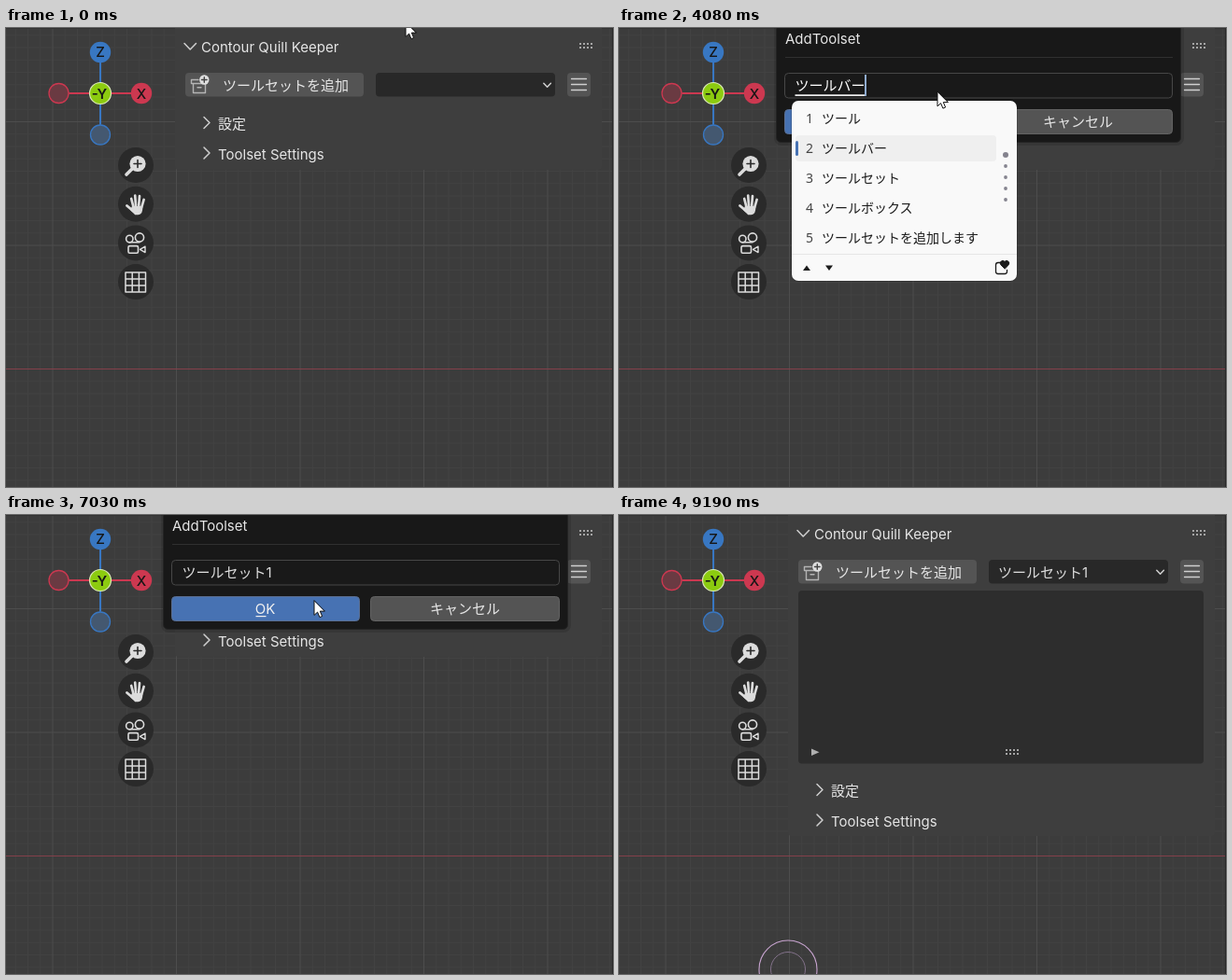
An HTML page that plays this animation: 650 px wide and 492 px high, repeating every 9320 ms.

```html
<!DOCTYPE html>
<html lang="ja">
<head>
<meta charset="utf-8">
<title>Toolset panel</title>
<style>
  html, body { margin: 0; width: 100%; height: 100%; overflow: hidden; background: #3c3c3c; }
  svg { display: block; width: 650px; height: 492px; }
  text { font-family: Inter, "Noto Sans CJK JP", sans-serif; font-size: 15px; white-space: pre; }
  .ime text { font-family: "Noto Sans", "Noto Sans CJK JP", sans-serif; font-size: 14px; }
</style>
</head>
<body>
<svg id="stage" viewBox="0 0 650 492" xmlns="http://www.w3.org/2000/svg"></svg>
<script>
const LOOP = 9320;
const stage = document.getElementById('stage');

// ---- markup helpers ----
const rect = (x, y, w, h, fill, r = 0, extra = '') =>
  `<rect x="${x}" y="${y}" width="${w}" height="${h}" rx="${r}" fill="${fill}" ${extra}/>`;
const circle = (x, y, r, fill, extra = '') =>
  `<circle cx="${x}" cy="${y}" r="${r}" fill="${fill}" ${extra}/>`;
const path = (d, stroke, w = 1.5, fill = 'none') =>
  `<path d="${d}" stroke="${stroke}" stroke-width="${w}" fill="${fill}" stroke-linecap="round" stroke-linejoin="round"/>`;
const text = (x, y, s, fill = '#e6e6e6', extra = '') =>
  `<text x="${x}" y="${y}" fill="${fill}" ${extra}>${s}</text>`;
const group = (id, body, extra = '') => `<g id="${id}" ${extra}>${body}</g>`;

function grip(x, y) {
  let s = '';
  for (let i = 0; i < 8; i++) s += rect(x + (i % 4) * 4, y + (i >> 2) * 4, 2, 2, '#a6a6a6');
  return s;
}

function viewport() {
  const step = 13.25;
  let minor = '', major = '';
  for (let i = -3; i < 46; i++) {
    const x = 50 + i * step, y = 100.5 + (i - 4) * step;
    const v = `M${x} 0V492`, h = `M0 ${y}H650`;
    if (i % 10 === 0) major += v; else minor += v;
    if ((i - 4) % 10 === 0) major += h; else minor += h;
  }
  return rect(0, 0, 650, 492, '#3c3c3c') + path(minor, '#424242', 1) + path(major, '#4d4d4d', 1) +
    path('M0 365.5H650', '#84404a', 1.2) +
    rect(0, 0, 650, 1, '#323232') + rect(649, 0, 1, 492, '#282828');
}

function gizmo() {
  const red = '#cc3850', blue = '#3877c2', ink = '#161616';
  const label = (x, y, s, w) => text(x, y, s, ink, `text-anchor="middle" font-weight="${w}"`);
  return path('M101 36V59', blue, 2) + path('M68 70H134', red, 2) + path('M101 82V103', blue, 2) +
    circle(56.5, 70, 10.5, '#6a3a42', `stroke="${red}" stroke-width="1.3"`) +
    circle(101, 114.5, 10.5, '#445870', `stroke="${blue}" stroke-width="1.3"`) +
    circle(101, 26, 11.2, blue) + circle(145, 70, 11.2, red) +
    circle(101, 70, 11.5, '#8ccb10', 'stroke="#dbe9b9" stroke-width="1.2"') +
    label(101, 31, 'Z', 500) + label(145, 75.5, 'X', 500) + label(100, 75.5, '-Y', 600);
}

function navButtons() {
  const c = '#dcdcdc';
  let s = '';
  for (let i = 0; i < 4; i++) s += circle(139, 147 + i * 41.7, 19, '#2a2a2a');
  // zoom
  s += path('M135 151L129 157', c, 3.6) + circle(141, 145.5, 8.6, c) + path('M141 141.5V149.5M137 145.5H145', '#2a2a2a', 1.6);
  // pan
  s += path('M134.2 183L136.5 192M138.2 179.5L139 190M143 180.2L142.2 190M147.6 184L145 193', c, 2.7) +
    path('M129.5 190.5L136 196', c, 2.9) +
    path('M135.5 191.5H145.5Q146 199 141.5 199.5H138.5L134 195Z', c, 1.5, c);
  // camera
  s += circle(132.3, 226, 3.7, 'none', `stroke="${c}" stroke-width="1.6"`) +
    circle(143, 224.5, 4.6, 'none', `stroke="${c}" stroke-width="1.6"`) +
    path('M132 229.8H143', c, 1.6) +
    rect(131, 233.6, 10.5, 7.6, 'none', 1.5, `stroke="${c}" stroke-width="1.6"`) +
    path('M143.5 237.4L149 234.2V240.6Z', c, 1.4);
  // grid
  s += path('M128 262H149.5V283H128ZM135.2 262V283M142.4 262V283M128 269H149.5M128 276H149.5', c, 1.5);
  return s;
}

function panel() {
  const c = '#cfcfcf';
  const sub = y => path(`M212 ${y - 6}L218 ${y}L212 ${y + 6}`, c, 1.5);
  return path('M181 0H638V148Q638 152 634 152H185Q181 152 181 148Z', 'none', 0, '#3e3e3e')
      .replace('<path', '<path id="panelBg"') +
    path('M191 16.5L197.2 23L203.5 16.5', c) +
    text(209, 25.5, 'Contour Quill Keeper') + grip(614, 16) +
    rect(192, 48, 191, 25.5, '#545454', 4, 'id="addBtn"') +
    path('M206 55.5H198.5V59.5H214.5M200.5 59.5V69.5H213.5V60M205 63.8H209', '#b4b4b4', 1.4) +
    circle(212.3, 55.5, 5.2, '#dedede') + path('M212.3 52.7V58.3M209.5 55.5H215.1', '#444', 1.4) +
    text(232, 66.5, 'ツールセットを追加') +
    rect(396, 48, 192, 25.5, '#282828', 4, 'id="drop"') +
    text(406, 66.5, '', '#dcdcdc', 'id="dropText"') +
    path('M575.8 59.3L579.6 63.3L583.4 59.3', c) +
    rect(601, 48, 25, 25.5, '#545454', 4) + path('M605.5 54.5H621.5M605.5 60.5H621.5M605.5 66.5H621.5', c, 1.3) +
    group('list', rect(192, 81, 434, 185.5, '#2d2d2d', 4) +
      path('M206 250.5L214.5 254.3L206 258Z', 'none', 0, '#b0b0b0') + grip(414, 251)) +
    group('subs', sub(101.5) + text(227, 108, '設定') + sub(134) + text(227, 140.5, 'Toolset Settings'));
}

function dialog() {
  return rect(166, -8, 439, 134, '#000', 8, 'opacity=".13"') +
    rect(168.5, -10, 433, 132.5, '#181818', 5, 'stroke="#242424"') +
    text(178, 17, 'AddToolset') + rect(178, 31, 415, 1, '#303030') +
    rect(177.5, 48.5, 415, 26.5, '#191919', 4, 'stroke="#474747"') +
    rect(177.5, 87.5, 201, 26, '#4772b3', 4, 'id="ok" stroke="#5b6f92"') +
    text(277.5, 106, 'OK', '#f0f0f0', 'text-anchor="middle"') + rect(267.5, 108, 11, 1.2, '#f0f0f0') +
    rect(390.5, 87.5, 202, 26, '#545454', 4, 'stroke="#636363"') +
    text(491.5, 106, 'キャンセル', '#e6e6e6', 'text-anchor="middle"') +
    text(188.5, 67, '', '#fff', 'id="entry"') +
    rect(0, 71.3, 0, 1.6, '#fff', 0, 'id="under"') +
    rect(0, 50, 2, 23, '#8fabcf', 0, 'id="caret"');
}

// Candidate window between x and right edge; pick is the selected row or -1.
function candidates({ x, right, rows, pick = -1 }) {
  const ink = '#1c1c1c', w = right - x;
  let s = rect(x - 1, 78, w + 2, 194, '#000', 8, 'opacity=".15"') + rect(x, 78, w, 193, '#f9f9f9', 7);
  rows.forEach((row, i) => {
    const y = 102 + i * 32;
    if (i === pick) s += rect(x + 4, y - 19, w - 26, 28, '#efefef', 4) + rect(x + 4, y - 13, 3, 16, '#4772b3', 1.5);
    s += text(x + 15, y, i + 1, pick < 0 ? '#9b9b9b' : '#444') + text(x + 32, y, row, ink);
    s += circle(right - 12, 136 + i * 12, i ? 1.9 : 3, '#84838e');
  });
  const h = right - 13;
  return s + rect(x, 242, w, 1, '#e6e6e6') +
    path(`M${x + 12} 260L${x + 16} 254.5L${x + 20} 260Z`, 'none', 0, ink) +
    path(`M${x + 36} 254.5L${x + 40} 260L${x + 44} 254.5Z`, 'none', 0, ink) +
    path(`M${h - 4} 251.5H${h - 7}Q${h - 9.5} 251.5 ${h - 9.5} 254V261Q${h - 9.5} 263.5 ${h - 7} 263.5H${h}Q${h + 2.5} 263.5 ${h + 2.5} 261V259.5`, ink, 1.3) +
    path(`M${h} 258L${h - 4.2} 253.8A2.5 2.5 0 0 1 ${h} 250.5A2.5 2.5 0 0 1 ${h + 4.2} 253.8Z`, ink, 1, ink);
}

stage.innerHTML = viewport() + gizmo() + navButtons() + panel() + group('dialog', dialog()) +
  group('ime', '', 'class="ime"') +
  group('brush', circle(0, 0, 31, 'none', 'stroke="#c8a4d0" stroke-width="1.1"') +
    circle(0, 0, 18.5, 'none', 'stroke="#83728a"')) +
  group('beam', path('M-3 -7.5H-.8M.8 -7.5H3M0 -7V7M-3 7.5H-.8M.8 7.5H3', '#fff', 1.4)) +
  group('arrow', path('M0 0V15.4L3.6 12.1L5.9 17.6L8.6 16.5L6.3 11.1H11Z', '#111', 1, '#fff'));

const el = {};
for (const n of stage.querySelectorAll('[id]')) el[n.id] = n;
const set = (n, attrs) => { for (const k in attrs) n.setAttribute(k, attrs[k]); };
const show = (n, on) => { n.style.display = on ? '' : 'none'; };

// ---- typing ----
const tool = ['ツール', 'ツールバー', 'ツールセット', 'ツールボックス', 'ツールセットを追加します'];
const lists = {
  t: { x: 185, right: 350, rows: ['Toolset', 't', 'type', 'true', 'test'] },
  tsu: { x: 185, right: 411, rows: ['使い方', '次', '作り方', '使い方を教えてください', '続き'] },
  tool: { x: 185, right: 426, rows: tool },
  one: { x: 268, right: 418, rows: ['1', 'Ⅻ', '①', '10月', 'Ⅰ'] }
};
const word = tool[2];
const pick = i => ({ ...lists.tool, pick: i });

// time, committed text, composing text, candidate window
const typing = [
  [0, '', '', null],
  [2890, '', 'ｔ', lists.t],
  [2960, '', 'つ', lists.tsu],
  [3160, '', 'つー', lists.tool],
  [3220, '', 'つーる', lists.tool],
  [3880, '', tool[0], pick(0)],
  [4080, '', tool[1], pick(1)],
  [4220, '', word, pick(2)],
  [4480, word, '', null],
  [5080, word, '1', lists.one],
  [5300, word + '1', '', null]
];
const widthOf = s => [...s].reduce((w, c) => w + (c === '1' ? 9 : 15), 0);

// ---- pointer ----
// start, end, number of steps, way points
const moves = [
  [70, 620, 8, [[428, -6], [408, 12], [372, 43], [347, 58], [344, 60], [339.5, 44.5]]],
  [890, 960, 2, [[339.5, 44.5], [341, 56], [342, 68.5]]],
  [2890, 2890, 1, [[341, 68.5], [341, 68.5]]],
  [6620, 6760, 3, [[341, 68.5], [341, 64], [336, 80], [330, 92]]],
  [7830, 8170, 6, [[330, 92], [341.5, 84], [352, 70], [394, 60], [440, 57], [470, 56.5], [482, 57]]],
  [8310, 8440, 3, [[482, 57], [479, 58], [476, 59], [474.5, 58]]],
  [8780, 9190, 7, [[474.5, 58], [462, 74], [400, 112], [292, 176], [160, 250], [70, 318], [30, 366], [181, 487]]]
];

function pointer(t) {
  let at = moves[0][3][0];
  for (const [a, b, n, pts] of moves) {
    if (t < a) break;
    const done = b > a ? Math.min(n, 1 + Math.floor((t - a) / (b - a) * (n - 1) + 1e-6)) : n;
    const u = done / n * (pts.length - 1), i = Math.min(pts.length - 2, Math.floor(u));
    at = [0, 1].map(k => pts[i][k] + (pts[i + 1][k] - pts[i][k]) * (u - i));
  }
  return at;
}

let shownList;

function render(t) {
  const [x, y] = pointer(t);
  const open = t >= 480 && t < 7100, made = t >= 7100;
  const inside = (l, r) => !open && x > l && x < r && y > 48 && y < 73.5;

  // panel
  const low = made ? 344 : 152;
  set(el.panelBg, { d: `M181 0H638V${low - 4}Q638 ${low} 634 ${low}H185Q181 ${low} 181 ${low - 4}Z` });
  set(el.subs, { transform: `translate(0 ${made ? 193 : 0})` });
  show(el.list, made);
  el.dropText.textContent = made ? word + '1' : '';
  set(el.addBtn, { fill: inside(192, 383) ? '#656565' : '#545454' });
  const overDrop = inside(396, 588);
  set(el.drop, { fill: overDrop ? '#2b2b2b' : '#282828' });
  set(el.dropText, { fill: overDrop ? '#fff' : '#dcdcdc' });

  // dialog
  show(el.dialog, open);
  const [, fixed, live, list] = typing.filter(s => s[0] <= t).pop();
  const left = 188.5 + widthOf(fixed), end = left + widthOf(live);
  el.entry.textContent = fixed + live;
  set(el.entry, { fill: t < 5700 ? '#fff' : '#dedede' });
  set(el.under, { x: left, width: end - left });
  set(el.caret, { x: end - 0.5, width: t < 5080 ? 2 : 1.4, fill: t < 5080 ? '#8fabcf' : '#e8eef6' });
  show(el.caret, t < 5760);
  set(el.ok, { fill: t >= 6690 && t < 6960 ? '#4d79bc' : '#4772b3' });
  if (list !== shownList) {
    el.ime.innerHTML = list ? candidates(list) : '';
    shownList = list;
  }

  // pointer shape
  const beam = (t >= 890 && t < 2890) || (t >= 6620 && t < 6690);
  const brush = made && (x < 182 || y > 344);
  const shape = brush ? el.brush : beam ? el.beam : el.arrow;
  for (const n of [el.brush, el.beam, el.arrow]) show(n, n === shape);
  set(shape, { transform: `translate(${x} ${y})` });
}

const start = performance.now();
function tick() {
  render((performance.now() - start) % LOOP);
  requestAnimationFrame(tick);
}
tick();
</script>
</body>
</html>
```
